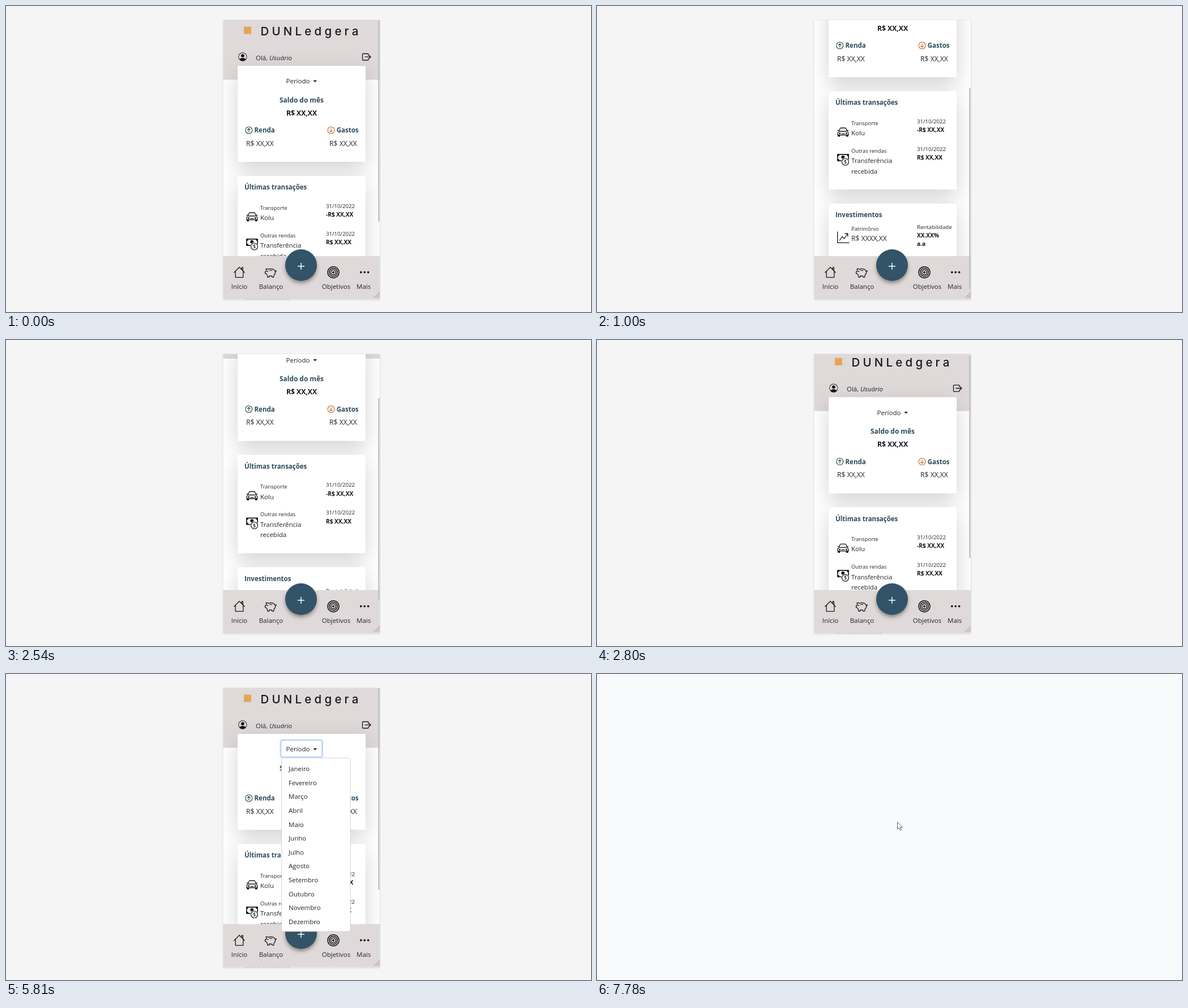
An HTML page for the animation above (8 s loop, 1033 by 542 pixels).

```html
<!DOCTYPE html>
<html lang="pt">
<head>
<meta charset="utf-8">
<title>Painel</title>
<style>
html, body { margin: 0; width: 100%; height: 100%; overflow: hidden; background: #f5f5f5; }
svg { display: block; width: 100vw; height: 100vh; }
text { font-family: "Open Sans", "Noto Sans", sans-serif; font-size: 11.5px; fill: #212529; white-space: pre; }
.b { font-weight: 700; fill: #111417; }
.h { font-weight: 700; fill: #2b4a5c; }
.s { font-size: 9.4px; }
.d { font-size: 9.6px; }
.m { font-size: 12.2px; }
.sb { font-size: 10.1px; font-weight: 700; fill: #111417; }
.brand { font-family: Inter, sans-serif; font-size: 20.5px; font-weight: 500; letter-spacing: 5.2px; fill: #15171a; }
.mid { text-anchor: middle; }
.line { fill: none; stroke: #16181b; stroke-width: 1.3; stroke-linecap: round; stroke-linejoin: round; }
</style>
</head>
<body>
<svg id="stage" viewBox="0 0 1033 542" xmlns="http://www.w3.org/2000/svg"></svg>
<script>
const LOOP = 8000;
const INK = '#16181b', PANEL = '#dfd9da';

const text = (x, y, str, cls = '') => `<text x="${x}" y="${y}" class="${cls}">${str}</text>`;
const rect = (x, y, w, h, fill, rest = '') =>
  `<rect x="${x}" y="${y}" width="${w}" height="${h}" fill="${fill}" ${rest}/>`;
const circle = (x, y, r, rest = '') => `<circle cx="${x}" cy="${y}" r="${r}" ${rest}/>`;
const line = (d, rest = '') => `<path class="line" d="${d}" ${rest}/>`;
const at = (x, y, body, scale = 1) => `<g transform="translate(${x} ${y}) scale(${scale})">${body}</g>`;
const card = (y, h) => rect(409, y, 226, h, '#fff', 'rx="2.5" filter="url(#cardShadow)"');

const icons = {
  user: `<path fill="${INK}" fill-rule="evenodd" d="M11 6a3 3 0 1 1-6 0 3 3 0 0 1 6 0z
    M0 8a8 8 0 1 1 16 0A8 8 0 0 1 0 8zm8-7a7 7 0 0 0-5.47 11.37C3.24 11.23 4.8 10 8 10s4.76 1.23 5.47 2.37A7 7 0 0 0 8 1z"/>`,
  exit: line('M11 3.5V1.5Q11 .5 10 .5H1.5Q.5 .5 .5 1.5V11Q.5 12 1.5 12H10Q11 12 11 11V9M5 6.2H15M12.3 3.5L15 6.2 12.3 9',
    'stroke-width="1.1"'),
  arrow: (color, flip) => `<g fill="none" stroke="${color}" stroke-width="1.1" stroke-linecap="round"
    stroke-linejoin="round" transform="scale(1 ${flip})">${circle(0, 0, 6)}<path d="M0 3.2V-3.2M-2.6 -.6L0 -3.2 2.6 -.6"/></g>`,
  car: line('M3.2 7.5L5 2.4Q5.5 1 7 1H14Q15.5 1 16 2.4L17.8 7.5Q20 8.5 20 10.5V13.5H1V10.5Q1 8.5 3.2 7.5ZM1.3 5.5H3.4M17.6 5.5H19.7', 'stroke-width="1.7"')
    + line('M5 7H16M8 11.3H13', 'stroke-width="1.6"')
    + circle(4.6, 10.6, 1.5, `fill="${INK}"`) + circle(16.4, 10.6, 1.5, `fill="${INK}"`)
    + rect(1.2, 13, 4, 3.6, INK, 'rx="1"') + rect(15.8, 13, 4, 3.6, INK, 'rx="1"'),
  money: rect(0, 0, 21, 13, INK, 'rx="1"')
    + '<path fill="#fff" d="M4 1.7H17Q17 4 19.3 4V9Q17 9 17 11.3H4Q4 9 1.7 9V4Q4 4 4 1.7Z"/>'
    + circle(10.3, 5.8, 3, `fill="${INK}"`)
    + circle(14.5, 14, 7.3, 'fill="#fff"') + circle(14.5, 14, 6, `fill="#fff" stroke="${INK}" stroke-width="1.2"`)
    + `<text x="14.5" y="17.2" class="mid" style="font-size:9px;font-weight:600">$</text>`,
  chart: line('M.7 0V19.3H21M4.5 15L9 8.5 12.5 12 18.5 3.5M14 3H18.8V7.8', 'stroke-width="1.4"'),
  home: line('M.8 10.5L10 1.2 19.2 10.5M3.2 8.5V19.2H16.8V8.5M14.2 5V1.6H16.4V7.2', 'stroke-width="1.4"'),
  pig: line(`M3 6.5L2.2 2.4Q4.5 2 6.2 3.4Q10.5 1.6 14.5 3.2Q18.6 5 18.6 9Q18.6 11.7 16.2 13.6L15.6 17.3H12.9L12.4 15.1
    Q10 15.5 8 15L7.5 17.3H4.9L4.3 13.5Q2.8 12.3 2 10.8H.6V7.3H2.4Q2.6 6.9 3 6.5ZM8.4 5.5Q10.5 4.7 12.8 5.5M18.4 7.6Q20.6 8 20 5.7`)
    + circle(5.2, 7.2, 1, `fill="${INK}"`),
  target: [10, 7.2, 4.5].map(r => circle(0, 0, r, 'class="line" style="stroke-width:1.5"')).join('')
    + circle(0, 0, 2, `fill="${INK}"`),
  more: [-6.4, 0, 6.4].map(x => circle(x, 0, 1.9, `fill="${INK}"`)).join('')
};

const header = rect(383, -200, 278, 330.5, PANEL)
  + rect(420, 36.5, 13, 13, '#e6a556')
  + text(449.5, 51.5, 'DUNLedgera', 'brand')
  + at(410.2, 82.3, icons.user, .96)
  + text(441, 96, 'Olá, <tspan font-style="italic">Usuário</tspan>')
  + at(629, 84, icons.exit);

const balance = card(106, 170)
  + '<rect id="ring" x="485" y="117" width="73.5" height="30.5" rx="3.5" fill="#fff" stroke="#bfd8fb" stroke-width="3"/>'
  + text(494.5, 137.3, 'Período') + '<path d="M542.4 131.6H549L545.7 135.2Z" fill="#212529"/>'
  + text(522, 170.7, 'Saldo do mês', 'h mid" style="font-size:11.9px')
  + text(522, 193.8, 'R$ XX,XX', 'b m mid')
  + at(428.8, 220, icons.arrow('#2d4b45', 1)) + text(438.5, 224.3, 'Renda', 'h')
  + at(574, 220, icons.arrow('#c26a2c', -1)) + text(583.7, 224.3, 'Gastos', 'h')
  + text(424, 247.8, 'R$ XX,XX', 'm') + text(571, 247.8, 'R$ XX,XX', 'm');

const entry = (y, kind, lines, amount) => text(449, y, kind, 's')
  + lines.map((s, i) => text(449, y + 18.5 + i * 18.5, s)).join('')
  + text(565, y - 3.1, '31/10/2022', 'd') + text(565, y + 12.4, amount, 'sb');

const activity = card(301, 174) + text(421, 325.3, 'Últimas transações', 'h')
  + at(424, 365, icons.car) + entry(360.6, 'Transporte', ['Kolu'], '-R$ XX,XX')
  + at(424, 412, icons.money) + entry(409.8, 'Outras rendas', ['Transferência', 'recebida'], 'R$ XX,XX');

const assets = card(500, 140) + text(421, 524.3, 'Investimentos', 'h')
  + at(424, 550, icons.chart)
  + text(449, 547.6, 'Patrimônio', 's') + text(449, 565.6, 'R$ XXXX,XX', 'm')
  + text(565, 545.3, 'Rentabilidade', 'd') + text(565, 559.9, 'XX.XX%', 'sb') + text(565, 574.6, 'a.a', 'sb');

const nav = rect(383, 443, 278, 78, PANEL)
  + at(402, 461.5, icons.home) + at(457, 463, icons.pig)
  + at(578, 471.7, icons.target) + at(633.2, 471.6, icons.more)
  + [[412, 'Início'], [468, 'Balanço'], [583, 'Objetivos'], [631.7, 'Mais']]
    .map(([x, label]) => text(x, 501.2, label, 'mid')).join('')
  + circle(521, 459, 28, 'fill="#315268" filter="url(#fabShadow)"')
  + '<path d="M515 461H527M521 455V467" stroke="#fff" stroke-width="1.5"/>'
  + '<path d="M650 517L660 507M654 517L660 511M658 517L660 515" stroke="#8f8c8c" stroke-width="1"/>';

const months = ['Janeiro', 'Fevereiro', 'Março', 'Abril', 'Maio', 'Junho', 'Julho', 'Agosto',
  'Setembro', 'Outubro', 'Novembro', 'Dezembro'];
const menu = rect(486.7, 148.6, 121.4, 307.4, '#fff', 'rx="3" stroke="#cfcfcf" stroke-width=".9"')
  + months.map((m, i) => text(499, 172.2 + i * 24.6, m)).join('');

const stage = document.getElementById('stage');
stage.innerHTML = `
<defs>
  <clipPath id="screen"><rect x="383.5" y="25" width="276.5" height="494.5"/></clipPath>
  <filter id="cardShadow" x="-40%" y="-50%" width="180%" height="210%">
    <feDropShadow dx="0" dy="12" stdDeviation="18" flood-color="#000" flood-opacity=".175"/></filter>
  <filter id="fabShadow" x="-40%" y="-40%" width="180%" height="180%">
    <feDropShadow dx="0" dy="4" stdDeviation="3" flood-color="#3c3522" flood-opacity=".5"/></filter>
  <filter id="frameShadow" x="-10%" y="-10%" width="120%" height="120%">
    <feDropShadow dx="0" dy="0.5" stdDeviation="1.2" flood-color="#000" flood-opacity=".25"/></filter>
</defs>
${rect(0, 0, 1033, 542, '#f5f5f5')}
${rect(383.5, 25, 276.5, 494.5, '#fff', 'filter="url(#frameShadow)"')}
<g clip-path="url(#screen)">
  <g id="page">${header}${balance}${activity}${assets}</g>
  ${nav}
  <rect id="thumb" x="657" y="25" width="2.5" height="357" fill="#c3c2c2"/>
</g>
<g id="menu">${menu}</g>
<circle id="touch" fill="#000" fill-opacity=".03" stroke="#000" stroke-opacity=".035"/>
<rect id="blank" width="1033" height="542" fill="#f9fafc"/>
<path id="pointer" d="M0 0V12.5L2.9 9.8 5 14.5 7 13.6 5 9.2H9Z" fill="#fff" stroke="#33363a" stroke-width=".8"/>`;

const part = Object.fromEntries(['page', 'ring', 'thumb', 'menu', 'touch', 'blank', 'pointer']
  .map(id => [id, document.getElementById(id)]));

// Each track holds [time, value] pairs; a value stays until the next one.
const scrollTrack = [[0, 0], [800, 22], [860, 72], [930, 120], [1000, 150], [1140, 157], [1230, 163], [1320, 168],
  [1400, 170], [2390, 158], [2460, 132], [2540, 97.5], [2600, 65], [2660, 39], [2730, 18], [2800, 4.7], [2860, 0]];
const ringTrack = [[0, 0], [4600, .5], [4660, 1], [5990, .5], [6050, 0]];
const menuTrack = [[0, 0], [4600, 1], [6050, 0]];
const touchTrack = [[0, 0], [4390, 11], [4460, 15], [4530, 18], [4600, 0], [5930, 14], [5990, 18], [6050, 0]];
const blankTrack = [[0, 0], [7710, .5], [7780, 1]];
const held = (track, t) => track.reduce((v, [time, next]) => t >= time ? next : v, 0);

// Pointer legs: quadratic curves walked in a few discrete steps.
const legs = [
  { from: 3180, to: 3960, end: 4020, steps: 12, a: [518, 237], c: [541, 190], b: [530, 142] },
  { from: 4020, to: 4250, end: 4390, steps: 3, a: [532, 140], c: [536, 137], b: [539, 135] },
  { from: 4920, to: 5460, end: 5810, steps: 9, a: [538, 135], c: [513, 240], b: [534, 335] },
  { from: 6410, to: 6690, end: LOOP, steps: 5, a: [534, 309], c: [534, 285], b: [530.5, 262.3] }
];

function pointerAt(t) {
  const leg = legs.find(l => t >= l.from && t < l.end);
  if (!leg) return null;
  const n = leg.steps - 1;
  const k = Math.min(n, Math.floor((t - leg.from) / (leg.to - leg.from) * n + 1e-6)) / n;
  const u = k * k * (3 - 2 * k);
  return leg.a.map((a, i) => (1 - u) ** 2 * a + 2 * u * (1 - u) * leg.c[i] + u * u * leg.b[i]);
}

function draw(t) {
  const scroll = held(scrollTrack, t);
  part.page.setAttribute('transform', `translate(0 ${-scroll})`);
  part.thumb.setAttribute('y', 25 + scroll * .8);
  part.ring.setAttribute('opacity', held(ringTrack, t));
  part.menu.setAttribute('opacity', held(menuTrack, t));
  part.blank.setAttribute('opacity', held(blankTrack, t));

  const second = t > 5000;
  part.touch.setAttribute('cx', second ? 534 : 539.5);
  part.touch.setAttribute('cy', second ? 335 : 135);
  part.touch.setAttribute('r', held(touchTrack, t));

  const tip = pointerAt(t);
  part.pointer.setAttribute('opacity', tip ? 1 : 0);
  if (tip) part.pointer.setAttribute('transform', `translate(${tip})`);
}

const start = performance.now();
function tick() {
  draw((performance.now() - start) % LOOP);
  requestAnimationFrame(tick);
}
tick();
</script>
</body>
</html>
```
